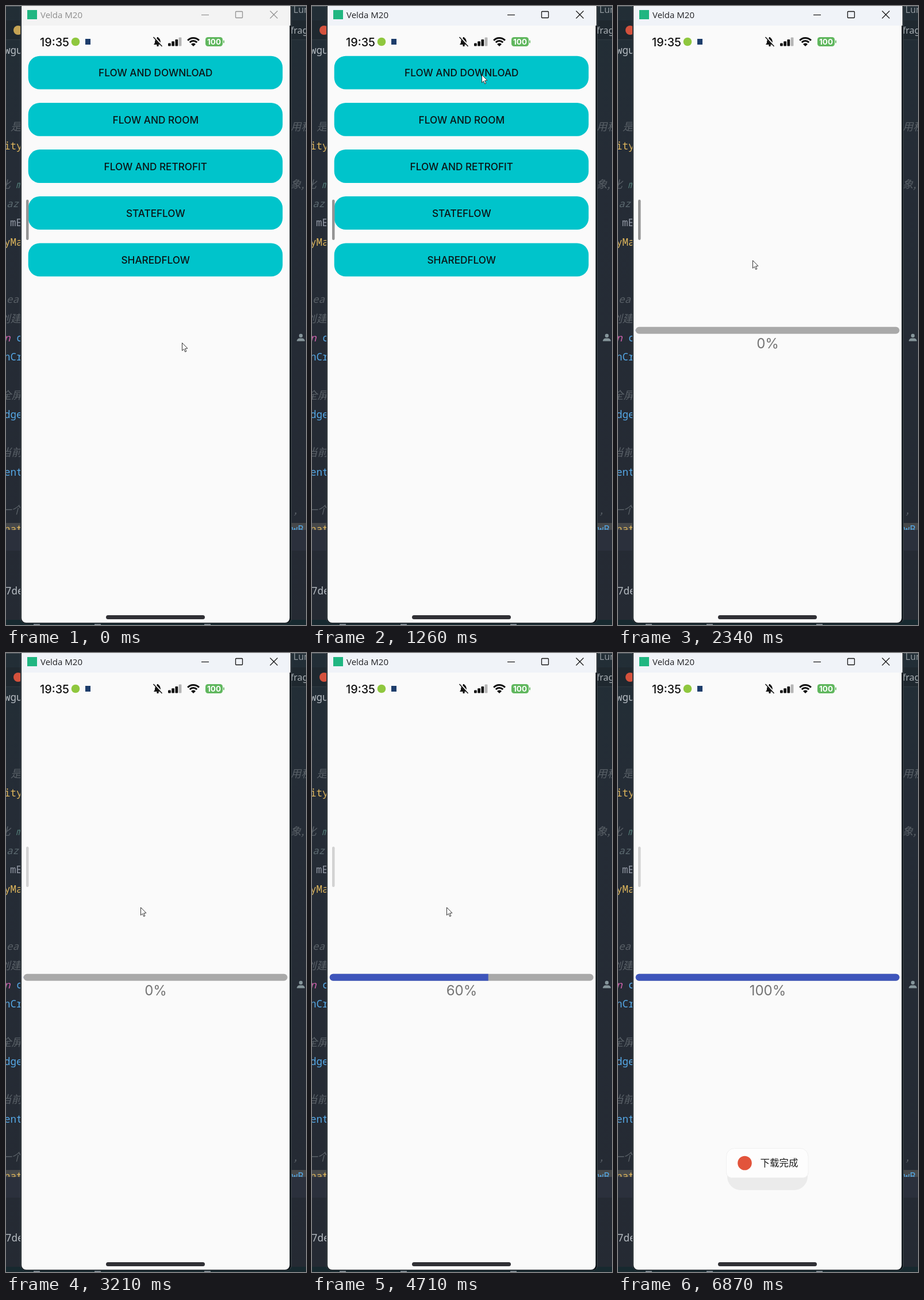
Write an HTML page with a canvas that moves like this. It is 522x1074 px and loops after 6890 ms.

```html
<!DOCTYPE html>
<html lang="en">
<head>
<meta charset="utf-8">
<title>Flow demo</title>
<style>
html, body { margin: 0; width: 100%; height: 100%; overflow: hidden; background: #252b34; }
canvas { display: block; width: 522px; height: 1074px; }
</style>
</head>
<body>
<canvas id="stage" width="522" height="1074"></canvas>
<script>
const LOOP = 6890;
const g = document.getElementById('stage').getContext('2d');
const UI = 'Inter, sans-serif';
const CODE = '"Noto Sans Mono", monospace';
const CJK = '"Noto Sans CJK SC", "Noto Sans CJK", sans-serif';
const GREY = '#596067', YELLOW = '#dcb45c', BLUE = '#55a8e6', PALE = '#b4bac0';
const PAGE = '#fafafa', INK = '#111';

const FOCUS = 990, OPEN = 1410, HANDLE_FADE = 2340, LOAD = 3750, TOAST = 5550;

const clamp = v => Math.max(0, Math.min(1, v));
const span = (t, from, to) => clamp((t - from) / (to - from));
const ease = p => p * p * (3 - 2 * p);
const mix = (a, b, p) => a + (b - a) * p;

function rect(x, y, w, h, color) {
  g.fillStyle = color;
  g.fillRect(x, y, w, h);
}
function round(x, y, w, h, r, color) {
  g.fillStyle = color;
  g.beginPath();
  g.roundRect(x, y, w, h, r);
  g.fill();
}
function dot(x, y, r, color) {
  g.fillStyle = color;
  g.beginPath();
  g.arc(x, y, r, 0, 7);
  g.fill();
}
function line(x1, y1, x2, y2, color, width) {
  g.strokeStyle = color;
  g.lineWidth = width;
  g.beginPath();
  g.moveTo(x1, y1);
  g.lineTo(x2, y2);
  g.stroke();
}
function text(str, x, y, font, color, align = 'left') {
  g.font = font;
  g.fillStyle = color;
  g.textAlign = align;
  g.fillText(str, x, y);
}
function clipped(x, y, w, h, paint) {
  g.save();
  g.beginPath();
  g.rect(x, y, w, h);
  g.clip();
  paint();
  g.restore();
}

// Editor rows share one line pitch
const rowY = n => 83 + n * 33.25;
const code = (str, x, n, color, style = '') => text(str, x, rowY(n), style + ' 17.5px ' + CODE, color);
const note = (str, x, n) => text(str, x, rowY(n), 'italic 18.5px ' + CJK, GREY);

function editor(active) {
  const sky = g.createLinearGradient(0, 0, 0, 1074);
  sky.addColorStop(0, '#222e36');
  sky.addColorStop(0.25, '#252c36');
  sky.addColorStop(1, '#252a33');
  rect(0, 0, 522, 1074, sky);
  rect(0, 0, 522, 1, '#555c62');
  rect(0, 25, 522, 34, '#1f282f');
  rect(0, 58, 522, 1, '#303a41');
  rect(0, 897, 522, 12, '#46484a');
  rect(0, 909, 522, 36, '#2b303c');
  rect(0, 1065, 522, 9, '#17292f');
  for (const x of [48, 154, 345]) rect(x, 1072, 11, 2, '#77828a');

  dot(21, 42, 8, active ? '#d4513c' : '#c5a253');
  code('wgu', -3, 0, PALE);
  note('是', 8, 4);
  code('ity', -3, 5, YELLOW);
  note('化', -11, 7);
  code('m', 17, 7, '#4f7773', 'italic');
  code('az', 1, 8, '#5c6a70', 'italic');
  code('mE', 7, 9, '#9298a4');
  code('yMa', -3, 10, YELLOW);
  code('ea', 1, 13, GREY, 'italic');
  note('创建', -11, 14);
  code('n', -3, 15, '#cf62ac', 'italic');
  code('c', 18, 15, BLUE);
  code('nCr', -3, 16, BLUE);
  note('全屏', -9, 18);
  code('dge', -3, 19, BLUE);
  note('当前', -9, 21);
  code('ent', -3, 22, BLUE);
  note('一个', -9, 24);
  code('7de', -1, 28.2, PALE);

  text('Lun', 500, 12, '16px "Noto Sans", sans-serif', '#8f979d');
  text('frag', 495, 48, '16px "Noto Sans", sans-serif', '#aab0b5');
  note('用程', 495, 4);
  note('象,', 495, 7);
  note(',', 501, 24);
  dot(513, 572, 3.2, '#85959a');
  round(506, 576.5, 14, 5, [5, 5, 0, 0], '#85959a');

  clipped(0, 895, 522, 14, () => {
    code('nat', -3, 25, YELLOW);
    code('wB', 497, 25, BLUE);
  });
}

function chrome(active) {
  round(25, -8, 472, 1079.5, 9, '#42494e');
  round(26, -8, 470, 1079, 8, '#0b1217');
  rect(27, 0, 468, 34, active ? '#f0f3f8' : '#f3f3f3');
  round(27, 34, 466.5, 1036, [0, 0, 8, 8], PAGE);
  rect(37, 7, 17, 16, '#20b681');
  text('Velda M20', 60, 20.5, '15px "Open Sans", sans-serif', active ? '#202124' : '#8d8d8d');

  const ink = active ? '#151515' : '#939393';
  line(340, 15.5, 353, 15.5, ink, 1.2);
  line(459.5, 8.5, 472.5, 21.5, ink, 1.2);
  line(472.5, 8.5, 459.5, 21.5, ink, 1.2);
  g.lineWidth = 1.3;
  g.beginPath();
  g.roundRect(399.5, 9.5, 12, 11, 1);
  g.stroke();
}

function bell(x, y) {
  g.fillStyle = INK;
  g.beginPath();
  g.moveTo(x - 7, y + 5);
  g.lineTo(x - 5, y + 2);
  g.bezierCurveTo(x - 5, y - 10, x + 5, y - 10, x + 5, y + 2);
  g.lineTo(x + 7, y + 5);
  g.fill();
  rect(x - 1, y - 8, 2, 3, INK);
  dot(x, y + 6.5, 1.8, INK);
  line(x - 6.5, y - 8.5, x + 8, y + 7, PAGE, 3.2);
  line(x - 7.5, y - 8, x + 7.5, y + 8, INK, 1.5);
}

function wifi(x, y) {
  const from = -Math.PI * 0.76, to = -Math.PI * 0.24;
  g.strokeStyle = g.fillStyle = INK;
  g.lineWidth = 3;
  for (const r of [13.5, 8.5]) {
    g.beginPath();
    g.arc(x, y, r, from, to);
    g.stroke();
  }
  g.beginPath();
  g.moveTo(x, y + 1);
  g.arc(x, y + 1, 5.5, from, to);
  g.fill();
}

function statusBar() {
  text('19:35', 59, 69.5, '500 19.8px ' + UI, INK);
  dot(121, 62, 7.3, '#8fc73e');
  rect(138, 57, 9, 10, '#1d3d6b');
  bell(264, 62);
  for (let i = 0; i < 4; i++) {
    const h = 5 + i * 3.3;
    round(282 + i * 6.2, 69.5 - h, 4.8, h, 1, i < 3 ? INK : '#b5b5b5');
  }
  wifi(326, 69);
  round(347, 54, 30, 16, 4.5, '#60b75e');
  round(378, 59.5, 1.8, 5, 1, '#60b75e');
  text('100', 362, 67, '700 13.5px ' + UI, '#fff', 'center');
}

function menu() {
  const names = ['FLOW AND DOWNLOAD', 'FLOW AND ROOM', 'FLOW AND RETROFIT', 'STATEFLOW', 'SHAREDFLOW'];
  names.forEach((name, i) => {
    const y = 86.7 + i * 81.2;
    round(38.7, y, 442.6, 57.8, 20, '#00c4cb');
    text(name, 260.3, y + 35.7, '500 17.2px ' + UI, '#0b1415', 'center');
  });
}

// Data arrives in chunks of 6 %, a little faster towards the end
function percent(t) {
  if (t < LOAD) return 0;
  const raw = t < 4710
    ? mix(6, 60, span(t, 3630, 4650))
    : mix(60, 102, span(t, 4710, 5250));
  return Math.min(100, Math.floor(raw / 6) * 6);
}

function download(t) {
  const pct = percent(t);
  const bar = color => round(30.7, 556.7, 459, 12, 6, color);
  bar('#a9a9a9');
  clipped(30, 550, 1 + 459.5 * pct / 100, 25, () => bar('#3e55bb'));
  text(pct + '%', 260.5, 594, '24px ' + UI, '#757575', 'center');
}

function sideHandle(t) {
  const v = Math.round(mix(148, 210, span(t, HANDLE_FADE, HANDLE_FADE + 480)));
  round(35, 336, 4.5, 70, 2.2, `rgb(${v},${v},${v})`);
}

function toast(t) {
  if (t < TOAST) return;
  g.globalAlpha = clamp(0.4 + (t - TOAST) / 300);
  round(190, 872, 140, 60, 24, '#ebebeb');
  round(188.5, 859.5, 142.5, 51, [14, 14, 9, 9], '#fdfdfd');
  g.strokeStyle = '#f0f0f0';
  g.lineWidth = 1;
  g.stroke();
  dot(220.5, 885, 12.3, '#e2543b');
  text('下载完成', 247.5, 891, '16.5px ' + CJK, '#1c1c1c');
  g.globalAlpha = 1;
}

// Up to the first button, down to the page, then out past the bottom corner
function pointerAt(t) {
  const up = ease(span(t, 230, 1080));
  const down = ease(span(t, 1600, 2190));
  const out = ease(span(t, 5800, 6450));
  const x = mix(mix(mix(306, 295, up), 234, down), 500, out);
  const y = mix(mix(mix(584, 119, up), 441, down), 1080, out);
  return [x, y];
}

function pointer(t) {
  const [x, y] = pointerAt(t).map(Math.round);
  const shape = [[0, 0], [0, 13.5], [3.1, 10.7], [5.2, 15.6], [7.3, 14.7], [5.2, 9.9], [9.4, 9.6]];
  g.beginPath();
  for (const [dx, dy] of shape) g.lineTo(x + 0.5 + dx, y + 0.5 + dy);
  g.closePath();
  g.fillStyle = '#fff';
  g.fill();
  g.strokeStyle = '#333';
  g.lineWidth = 1;
  g.stroke();
}

function draw(t) {
  const active = t >= FOCUS;
  editor(active);
  chrome(active);
  statusBar();
  if (t < OPEN) menu();
  else download(t);
  sideHandle(t);
  toast(t);
  round(174, 1057, 172, 7, 3.5, '#303035');
  pointer(t);
}

const start = performance.now();
function tick() {
  draw((performance.now() - start) % LOOP);
  requestAnimationFrame(tick);
}
tick();
</script>
</body>
</html>
```
